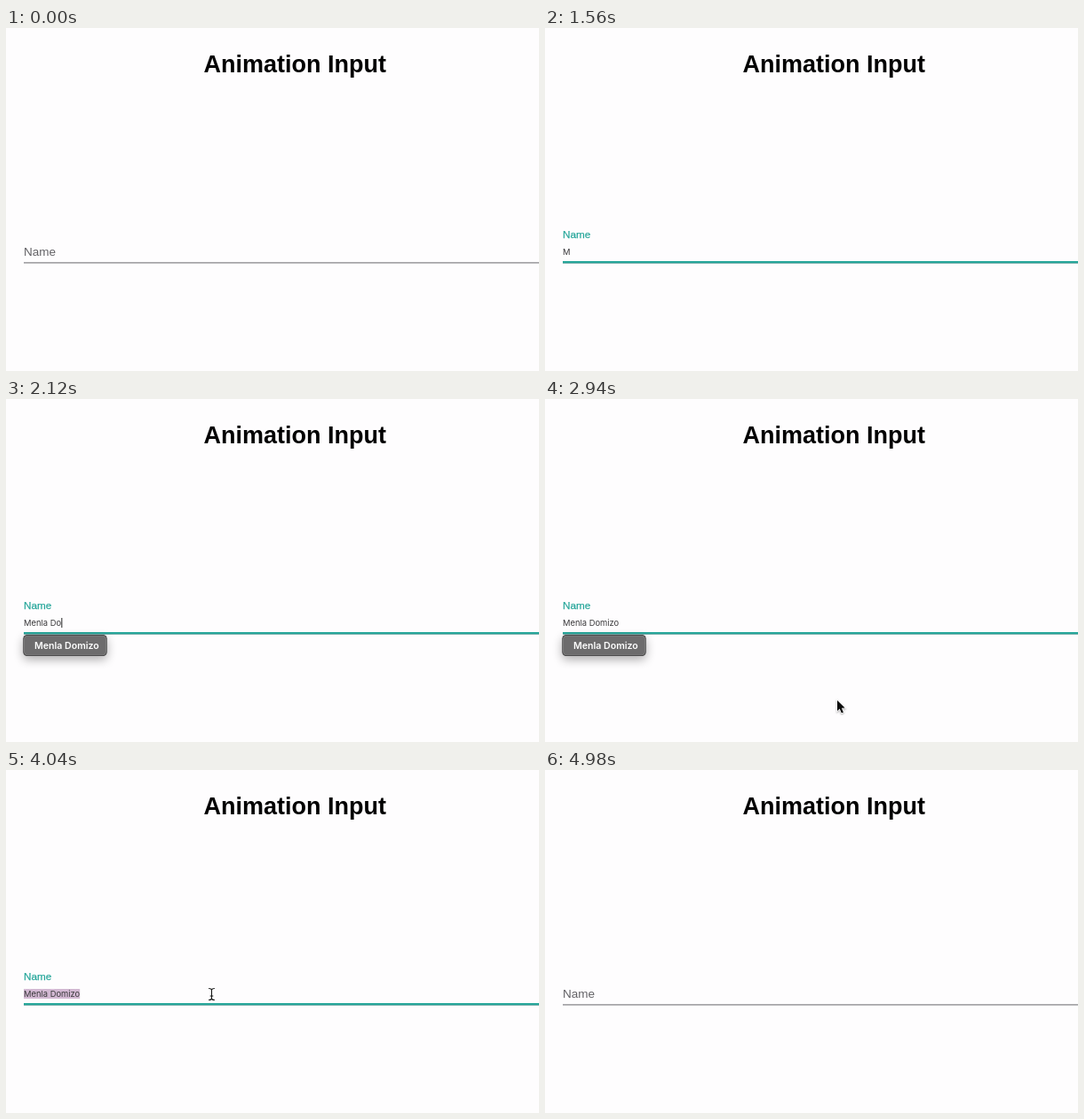
These frames come from a looping animation (600 by 387 pixels, 5 s). An HTML page with a canvas:

```html
<!DOCTYPE html>
<html lang="en">
<head>
<meta charset="utf-8">
<title>Animation Input</title>
<style>
  html, body { margin: 0; width: 100%; height: 100%; overflow: hidden; background: #fefdfe; }
  canvas { display: block; width: 600px; height: 387px; }
</style>
</head>
<body>
<canvas id="stage"></canvas>
<script>
const W = 600, H = 387, LOOP = 5000;
const SANS = '"Liberation Sans", Arial, sans-serif';
const UI = 'Inter, Roboto, sans-serif';
const BG = '#fefdfe', TEAL = [38, 166, 154], GREY = [98, 97, 101];
const NAME = 'Menla Domizo';
const FOCUS = 645, BLUR = 4400, FADE = 165;
const HIDE = 1180, SHOW = 2560, SELECT = 3760, CLEAR = 4140;

const canvas = document.getElementById('stage');
const ctx = canvas.getContext('2d');
const dpr = window.devicePixelRatio || 1;
canvas.width = W * dpr;
canvas.height = H * dpr;

// Pointer path: time, x, y
const path = [
  [20, 390, 352], [280, 298, 252], [SHOW, 298, 252], [2820, 319, 320],
  [2880, 329, 340], [3060, 329, 340], [3340, 240, 262], [3560, 231.5, 253],
  [CLEAR, 231.5, 253], [4380, 315, 325], [4500, 317, 328], [4860, 317, 400]
];

const clamp = v => Math.max(0, Math.min(1, v));
const mix = (a, b, k) => a + (b - a) * k;
const within = (t, a, b) => t >= a && t < b;
const blend = (a, b, k) => `rgb(${a.map((v, i) => Math.round(mix(v, b[i], k)))})`;

// CSS "ease": cubic-bezier(.25, .1, .25, 1)
function ease(x) {
  x = clamp(x);
  const curve = (a, b, s) => 3 * a * s * (1 - s) ** 2 + 3 * b * s * s * (1 - s) + s ** 3;
  let lo = 0, hi = 1;
  for (let i = 0; i < 24; i++) {
    const mid = (lo + hi) / 2;
    if (curve(.25, .25, mid) < x) lo = mid; else hi = mid;
  }
  return curve(.1, 1, lo);
}

function text(str, x, y, font, color) {
  ctx.font = font;
  ctx.fillStyle = color;
  ctx.fillText(str, x, y);
}

function typed(t) {
  if (t < HIDE || t >= CLEAR) return '';
  const n = t < 1600 ? 1 : 2 + Math.floor((t - 1600) / 80);
  return NAME.slice(0, n);
}

function caretOn(t) {
  return within(t, 820, 1500) || within(t, 1600, 2900) ||
    within(t, 3400, SELECT) || within(t, CLEAR, BLUR);
}

function drawField(t) {
  const k = t < BLUR ? ease((t - FOCUS) / FADE) : 1 - ease((t - BLUR) / FADE);

  ctx.fillStyle = '#807f83';
  ctx.fillRect(20, 264.3, 580, 1.2);
  if (k > 0) {
    ctx.fillStyle = blend(TEAL, TEAL, 0);
    ctx.fillRect(20, 263, 611 * k, 2.4);
  }

  const up = within(t, FOCUS, 820) ? 236.3 : 237.4;
  const y = mix(257, up, k), size = mix(13.5, 11.7, k);
  text('Name', 20, y, `${size}px ${SANS}`, blend(GREY, TEAL, k));
  if (within(t, 820, BLUR)) {
    ctx.strokeStyle = blend(TEAL, TEAL, 0);
    ctx.lineWidth = .25;
    ctx.strokeText('Name', 20, y);
  }

  const value = typed(t), font = `9.4px ${UI}`;
  ctx.font = font;
  const width = ctx.measureText(value).width;
  if (within(t, SELECT, CLEAR)) {
    ctx.fillStyle = '#d3b9d3';
    ctx.fillRect(20, 247, width, 11);
  }
  text(value, 20, 256, font, '#3a393b');
  if (caretOn(t)) {
    ctx.fillStyle = '#222';
    ctx.fillRect(20 + width + .3, 247, 1, 11);
  }
}

function drawMenu(width, rows) {
  const h = 5 + 19 * rows.length;
  ctx.save();
  ctx.shadowColor = 'rgba(0,0,0,.32)';
  ctx.shadowBlur = 11 * dpr;
  ctx.shadowOffsetY = 4 * dpr;
  ctx.fillStyle = '#3c3b3c';
  ctx.beginPath();
  ctx.roundRect(19.3, 266, width, h, 4.5);
  ctx.fill();
  ctx.restore();
  ctx.fillStyle = '#6d6c6d';
  ctx.strokeStyle = '#858485';
  ctx.lineWidth = .8;
  ctx.beginPath();
  ctx.roundRect(20.5, 267.2, width - 2.4, h - 2.4, 3.5);
  ctx.fill();
  ctx.stroke();
  rows.forEach((row, i) => text(row, 32, 282.3 + 19 * i, `600 10.6px ${UI}`, '#fff'));
}

function drawMenus(t) {
  const short = [NAME, 'Menla', 'Meu nome', 'Mesa', 'Melodia', 'Mel'];
  const long = [NAME, 'Minha lista de compras', ...short.slice(1)];
  if (within(t, 1620, 1700)) drawMenu(198, long);
  else if (within(t, 1700, 1800)) drawMenu(94.4, short);
  else if (within(t, 1800, 3040)) drawMenu(94.4, [NAME]);
}

function pointerAt(t) {
  const i = path.findIndex(p => p[0] > t);
  if (i < 1) return null;
  const a = path[i - 1], b = path[i];
  const s = (t - a[0]) / (b[0] - a[0]);
  const k = s * s * (3 - 2 * s);
  return [mix(a[1], b[1], k), mix(a[2], b[2], k)];
}

function drawBeam() {
  const shape = () => {
    ctx.beginPath();
    ctx.moveTo(-3.4, -6.5);
    ctx.quadraticCurveTo(-.4, -6.5, 0, -5);
    ctx.quadraticCurveTo(.4, -6.5, 3.4, -6.5);
    ctx.moveTo(0, -5);
    ctx.lineTo(0, 5);
    ctx.moveTo(-3.4, 6.5);
    ctx.quadraticCurveTo(-.4, 6.5, 0, 5);
    ctx.quadraticCurveTo(.4, 6.5, 3.4, 6.5);
    ctx.moveTo(-1.8, 2);
    ctx.lineTo(1.8, 2);
    ctx.stroke();
  };
  ctx.strokeStyle = '#fff';
  ctx.lineWidth = 2.4;
  shape();
  ctx.strokeStyle = '#161616';
  ctx.lineWidth = 1.1;
  shape();
}

function drawArrow() {
  const pts = [[0, 0], [0, 12], [2.7, 9.5], [4.8, 14.3], [6.9, 13.4], [4.9, 8.7], [8.6, 8.6]];
  ctx.save();
  ctx.shadowColor = 'rgba(0,0,0,.35)';
  ctx.shadowBlur = 2 * dpr;
  ctx.shadowOffsetY = dpr;
  ctx.beginPath();
  pts.forEach(p => ctx.lineTo(...p));
  ctx.closePath();
  ctx.strokeStyle = '#fff';
  ctx.lineWidth = 1.6;
  ctx.stroke();
  ctx.restore();
  ctx.fillStyle = '#0c0c0c';
  ctx.fill();
}

function drawPointer(t) {
  if (within(t, HIDE, SHOW)) return;
  const p = pointerAt(t);
  if (!p) return;
  ctx.save();
  ctx.translate(...p);
  if (within(p[1], 242, 266)) drawBeam(); else drawArrow();
  ctx.restore();
}

function draw(t) {
  ctx.setTransform(dpr, 0, 0, dpr, 0, 0);
  ctx.fillStyle = BG;
  ctx.fillRect(0, 0, W, H);
  text('Animation Input', 222.6, 50, `bold 27px ${SANS}`, '#000');
  drawField(t);
  drawMenus(t);
  drawPointer(t);
}

const start = performance.now();
function tick() {
  draw((performance.now() - start) % LOOP);
  requestAnimationFrame(tick);
}
tick();
</script>
</body>
</html>
```
